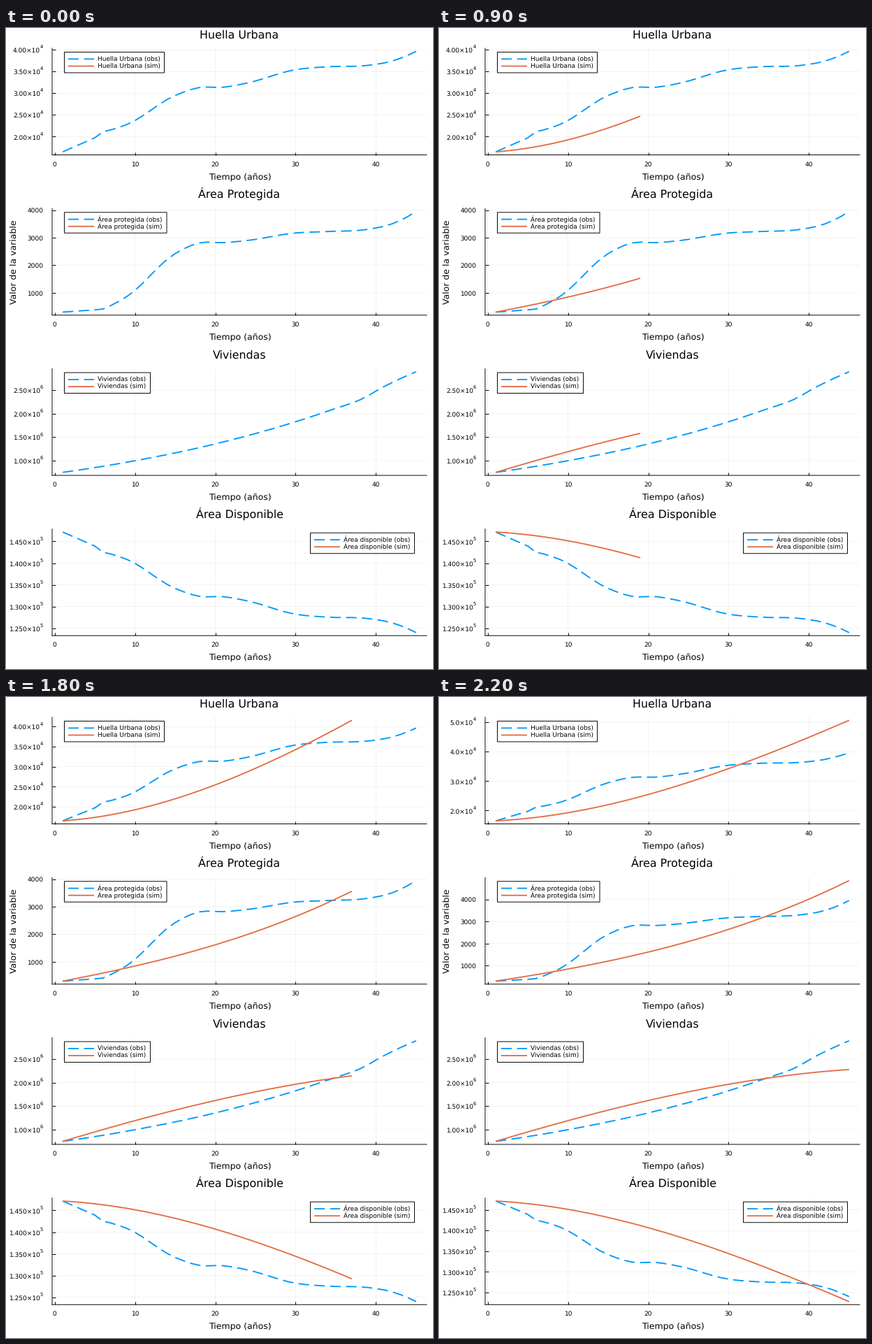
Write a matplotlib script that moves like this. It is 611 px wide and 917 px high and loops after 2.25 s.

```python
import matplotlib.pyplot as plt
import numpy as np
from matplotlib.animation import FuncAnimation
from matplotlib.lines import Line2D
from matplotlib.patches import Rectangle

W, H = 611, 917
LEFT, RIGHT, HEIGHT = 66, 602, 152.5
INSET = 17.5
BLUE, ORANGE = "#009afa", "#e36f47"
LINE, THIN = 1.89, 0.95
DASH = (0, (8, 4))
YEARS = np.arange(1, 46)
TITLE, GUIDE, SMALL, SUPER = 15.86, 12.46, 9.06, 6.9

plt.rcParams.update({
    "font.family": "DejaVu Sans",
    "text.hinting": "none",
    "axes.linewidth": THIN,
    "path.snap": False,
    "lines.solid_capstyle": "butt",
    "lines.dash_capstyle": "butt",
})

# At 72 dpi one point is one pixel.
fig = plt.figure(figsize=(W / 72, H / 72), dpi=72, facecolor="white")


def text(x, y, s, size, **kw):
    """Text with its baseline at pixel (x, y), measured from the top left."""
    return fig.text(x / W, 1 - y / H, s, fontsize=size, va="baseline", **kw)


def smooth(years, values):
    """Cubic Hermite curve through key points, sampled once a year."""
    t, v = np.array(years, float), np.array(values, float)
    m = np.gradient(v, t, edge_order=2)
    k = np.clip(np.searchsorted(t, YEARS, "right") - 1, 0, len(t) - 2)
    h = t[k + 1] - t[k]
    s = (YEARS - t[k]) / h
    return ((1 + 2 * s) * (1 - s) ** 2 * v[k] + s * (1 - s) ** 2 * h * m[k]
            + s * s * (3 - 2 * s) * v[k + 1] + s * s * (s - 1) * h * m[k + 1])


def observed(start, slope, values):
    """Straight growth for five years, then a curve through key points."""
    years = (6, 9, 15, 18, 21, 24, 30, 34, 39, 42, 45)
    return np.where(YEARS < 6, start + slope * (YEARS - 1),
                    smooth(years, values))


def simulated(*values):
    """Cubic through the values at years 1, 15, 31 and 45."""
    return np.polyval(np.polyfit((1, 15, 31, 45), values, 3), YEARS)


class Panel:
    def __init__(self, row, title, name, obs, sim, step, digits=0, exp=None,
                 legend_w=143, legend_right=False):
        self.top = 29 + row * H / 4
        self.obs, self.sim = obs, sim
        self.step, self.digits, self.exp = step, digits, exp
        self.labels = []
        bottom = self.top + HEIGHT
        mid = (LEFT + RIGHT) / 2

        ax = self.ax = fig.add_axes([LEFT / W, 1 - bottom / H,
                                     (RIGHT - LEFT) / W, HEIGHT / H])
        ax.patch.set_visible(False)
        ax.spines[["top", "right"]].set_visible(False)
        ax.set_axisbelow(True)
        ax.grid(color="black", alpha=0.1, lw=THIN / 2)
        ax.tick_params(direction="in", length=4.5, width=THIN,
                       labelleft=False, labelbottom=False)
        ax.set_xlim(-0.32, 46.32)
        ax.set_xticks(range(0, 41, 10))
        ax.plot(YEARS, obs, color=BLUE, lw=LINE, ls=DASH)
        self.line, = ax.plot([], [], color=ORANGE, lw=LINE)

        text(mid, self.top - 14.7, title, TITLE, ha="center")
        text(mid + 0.5, bottom + 34.6, "Tiempo (años)", GUIDE, ha="center")
        for t in range(0, 41, 10):
            x = LEFT + (t + 0.32) / 46.64 * (RIGHT - LEFT)
            text(x, bottom + 15.9, str(t), SMALL, ha="center")
        x = RIGHT - INSET - legend_w if legend_right else LEFT + INSET
        self.legend(name, x, legend_w)

    def legend(self, name, x, w):
        y, h = self.top + 5.5, 29.5
        fig.add_artist(Rectangle((x / W, 1 - (y + h) / H), w / W, h / H,
                                 fc="white", ec="black", lw=THIN,
                                 transform=fig.transFigure, zorder=5))
        rows = (("obs", BLUE, DASH), ("sim", ORANGE, "-"))
        for i, (kind, color, style) in enumerate(rows):
            row = self.top + 15.4 + 10.1 * i
            fig.add_artist(Line2D([(x + 5.5) / W, (x + 42.5) / W],
                                  [1 - row / H] * 2, color=color, lw=LINE,
                                  ls=style, zorder=6))
            text(x + 47.7, row + 3.3, f"{name} ({kind})", SMALL, zorder=6)

    def ticks(self, lo, hi):
        step, digits = self.step, self.digits
        if hi - lo > 6.5 * step and digits == 2:
            step, digits = 2 * step, 1
        values = np.arange(np.ceil(lo / step), np.floor(hi / step) + 1) * step
        return values, digits

    def show(self, count):
        sim = self.sim[:count]
        self.line.set_data(YEARS[:count], sim)
        lo = min(self.obs.min(), sim.min())
        hi = max(self.obs.max(), sim.max())
        pad = 0.03 * (hi - lo)
        lo, hi = lo - pad, hi + pad
        self.ax.set_ylim(lo, hi)
        values, digits = self.ticks(lo, hi)
        self.ax.set_yticks(values)

        for label in self.labels:
            label.remove()
        self.labels = []
        for v in values:
            y = self.top + (hi - v) / (hi - lo) * HEIGHT
            s = f"{v:.{digits}f}"
            if self.exp is None:
                self.labels.append(text(53.3, y + 3.7, s, SMALL, ha="right"))
            else:
                self.labels += [
                    text(49, y + 4, s + "×10", SMALL, ha="right"),
                    text(48.6, y - 1.8, str(self.exp), SUPER),
                ]


# Values are in units of each axis' power of ten.
urban = observed(1.65, 0.081, (2.113, 2.281, 2.948, 3.13, 3.138, 3.236,
                               3.542, 3.609, 3.641, 3.74, 3.965))
protected = observed(300, 20.5, (411, 868, 2424, 2812, 2820, 2900,
                                 3172, 3225, 3305, 3502, 3950))
homes = smooth((1, 10, 20, 30, 35, 38, 41, 45),
               (0.75, 0.998, 1.356, 1.828, 2.113, 2.293, 2.576, 2.892))
free = (16.365 - urban) / 10

panels = [
    Panel(0, "Huella Urbana", "Huella Urbana", urban,
          simulated(1.65, 2.2, 3.527, 5.07), step=0.5, digits=2, exp=4),
    Panel(1, "Área Protegida", "Área protegida", protected,
          simulated(300, 1206, 2765, 4857), step=1000, legend_w=146.5),
    Panel(2, "Viviendas", "Viviendas", homes,
          simulated(0.75, 1.415, 1.995, 2.28), step=0.5, digits=2, exp=6,
          legend_w=123),
    Panel(3, "Área Disponible", "Área disponible", free,
          simulated(1.4715, 1.4317, 1.3372, 1.228), step=0.05, digits=3,
          exp=5, legend_w=149, legend_right=True),
]
text(14.5, 334.5, "Valor de la variable", GUIDE, rotation=90, ha="center",
     rotation_mode="anchor")


def update(frame):
    for panel in panels:
        panel.show(frame + 1)


anim = FuncAnimation(fig, update, frames=len(YEARS), init_func=lambda: update(0),
                     interval=50, repeat=True, repeat_delay=0, blit=False)
plt.show()
```
